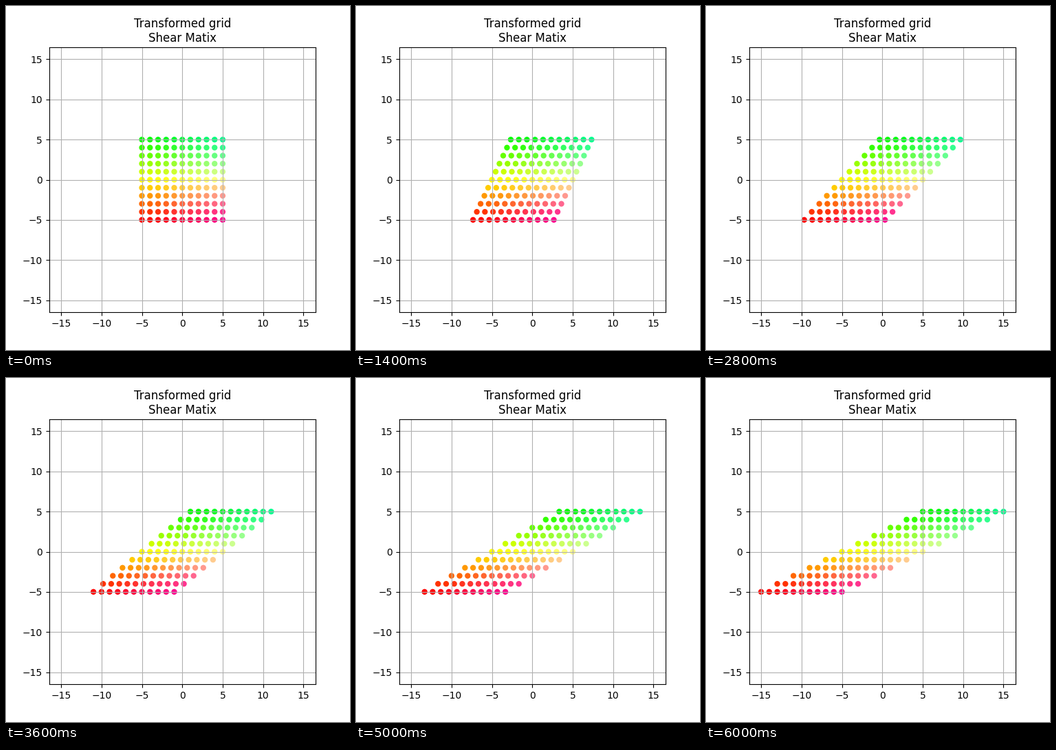
A matplotlib script for the animation above (6200 ms loop, 500 by 500 pixels).

```python
import numpy as np
import matplotlib.pyplot as plt
from matplotlib.animation import FuncAnimation

FRAMES, STEP_MS = 31, 200
MAX_SHEAR = 2.0
LIMIT = 16.5

x, y = (a.ravel() for a in np.meshgrid(np.arange(-5, 6), np.arange(-5, 6)))


def point_colors(x, y):
    red = 1 - y / 5
    green = 1 + y / 5
    blue = 1 / 4 + x / 16
    return np.clip(np.column_stack([red, green, blue]), 0, 1)


fig, ax = plt.subplots(figsize=(5, 5), dpi=100)
dots = ax.scatter(x, y, s=36, c=point_colors(x, y), edgecolors="none")
ax.set_xlim(-LIMIT, LIMIT)
ax.set_ylim(-LIMIT, LIMIT)
ax.grid(True)
ax.set_title("Transformed grid\nShear Matix")


def update(i):
    shear = MAX_SHEAR * i / (FRAMES - 1)
    dots.set_offsets(np.column_stack([x + shear * y, y]))
    return (dots,)


anim = FuncAnimation(fig, update, frames=FRAMES, interval=STEP_MS,
                     repeat=True, repeat_delay=0)
plt.show()
```
